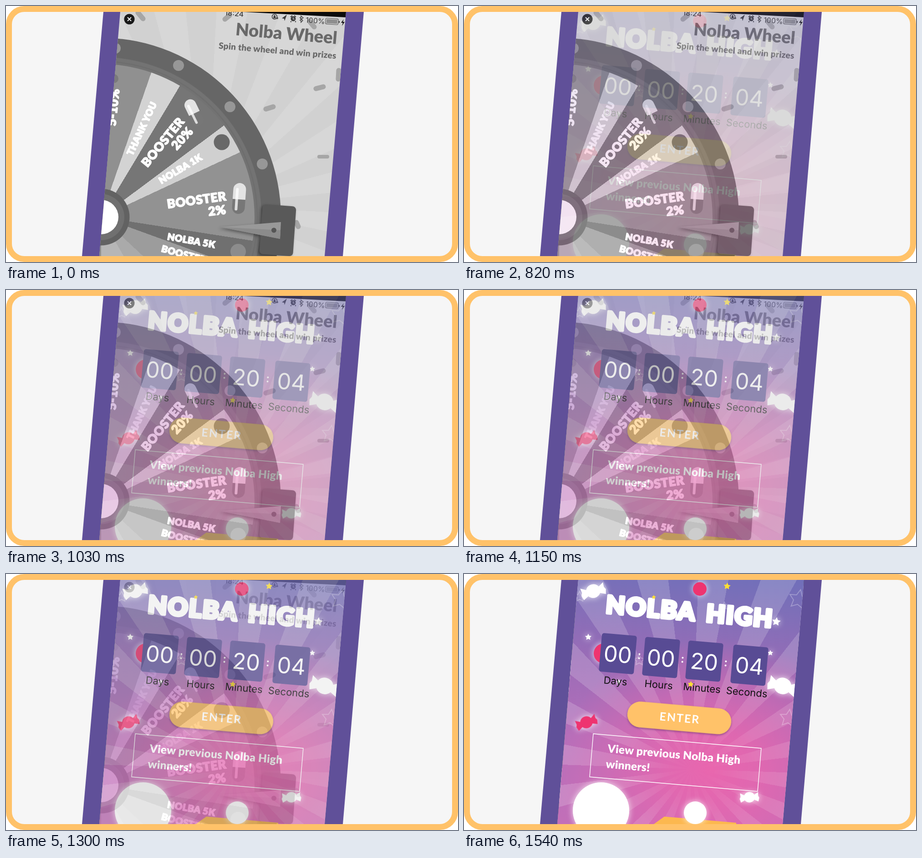
These frames come from a looping animation (993 px wide and 564 px high, 2810 ms). An HTML page:

```html
<!DOCTYPE html>
<html lang="en">
<head>
<meta charset="utf-8">
<title>Prize wheel and countdown</title>
<style>
html, body { margin: 0; width: 100%; height: 100%; overflow: hidden; background: #fff; }
.stage { position: relative; width: 993px; height: 564px; overflow: hidden; }
.frame, .phone, .scene, .scene > * { position: absolute; inset: 0; }
.frame { box-sizing: border-box; border: 13px solid #ffc269; border-radius: 40px; background: #f6f6f6; }
.phone { background: #605099; clip-path: polygon(214px 13px, 786px 13px, 740px 551px, 167px 551px); }
.scene { clip-path: polygon(251px 13px, 747px 13px, 700px 551px, 205px 551px); }
svg { width: 993px; height: 564px; }

.spin { background: repeating-conic-gradient(from 3deg at 440px 440px, #d7d7d7 0 9deg, #d1d1d1 0 18deg); }
.scene > .disc { inset: auto; left: 209px; top: 465px; border-radius: 50%; transform: translate(-50%, -50%); }
.rim { width: 790px; height: 790px; background: radial-gradient(closest-side, #737373 0 89%, #666 89.4%); }
.face {
  width: 674px; height: 674px;
  background: conic-gradient(#909090 19.1deg, #d3d3d3 0 30.9deg, #767676 0 53.2deg, #d0d0d0 0 64.9deg,
    #929292 0 98.9deg, #707070 0 110deg, #9c9c9c 0 133deg, #aaa 0 150deg, #b6b6b6 0 180deg, #909090 0);
}

.party {
  background:
    radial-gradient(340px 290px at 545px 430px, #e966ae 0, #e966aecc 30%, #e966ae00),
    repeating-conic-gradient(from 2deg at 500px 430px, #ffffff1a 0 9deg, #fff0 0 18deg),
    linear-gradient(185deg, #6a6fbb 0, #7c6fb8 15%, #9a6cb7 38%, #b56fba 65%, #c56fb8 100%);
}
.rays {
  background: repeating-conic-gradient(from 2deg at 500px 430px, #ffffff14 0 9deg, #fff0 0 18deg);
  -webkit-mask: radial-gradient(circle at 500px 430px, #0000 30px, #000 150px);
  mask: radial-gradient(circle at 500px 430px, #0000 30px, #000 150px);
}
.high { animation: fade 2810ms infinite; }
@keyframes fade {
  0% { opacity: 0; }
  23.843% { opacity: 0; animation-timing-function: steps(30, start); }
  55.871%, 100% { opacity: 1; }
}

text { font-family: Lato, "Open Sans", sans-serif; font-weight: 900; text-anchor: middle; }
.ui { font-family: Inter, Roboto, sans-serif; font-weight: 400; }
.puffy { fill: #fff; stroke: #fff; stroke-width: 1.8; stroke-linejoin: round; font-size: 27px; letter-spacing: .6px; }
.small { font-size: 20.5px; }
.title { font-size: 54px; stroke-width: 6px; letter-spacing: 2px; word-spacing: 10px; }
.start { text-anchor: start; }
.glow { filter: drop-shadow(0 0 7px #fffc); }
.shade { filter: drop-shadow(-3px 3px 3px #0006); }
.line { fill: none; stroke: #fff; stroke-opacity: .28; stroke-width: 2; }
.line use, #star { vector-effect: non-scaling-stroke; }
</style>
</head>
<body>
<div class="stage">
  <div class="frame"></div>
  <div class="phone"></div>

  <div class="scene">
    <div class="spin"></div>
    <svg viewBox="0 0 993 564">
      <g stroke="#a6a6a6" stroke-width="11" stroke-linecap="round">
        <path d="M681 182l16-4M571 227l16-5M731 142l-1 19M638 477l4 9M481 29l10-8M290 15l11 13M667 34l10 12"/>
        <path d="M688 332h18" stroke-width="8"/>
      </g>
    </svg>
    <div class="disc rim"></div>
    <div class="disc face"></div>
    <svg viewBox="0 0 993 564">
      <circle cx="209" cy="465" r="343" fill="none" stroke="#666" stroke-width="3" stroke-opacity=".35"/>
      <g fill="#979797">
        <circle cx="240" cy="93" r="12"/><circle cx="379" cy="131" r="12"/>
        <circle cx="492" cy="222" r="12"/><circle cx="563" cy="348" r="12"/>
        <circle cx="237" cy="160" r="10" fill="#7b7b7b"/>
      </g>
      <circle cx="209" cy="465" r="62.5" fill="#626262"/>
      <circle cx="209" cy="465" r="51" fill="#707070"/>
      <circle cx="209" cy="465" r="38" fill="#fff"/>

      <g class="puffy">
        <text transform="translate(245 224) rotate(-84)">5-10%</text>
        <text class="small" transform="translate(305 273) rotate(-65)">THANK YOU</text>
        <text transform="translate(352 306) rotate(-51)">BOOSTER</text>
        <text transform="translate(394 298) rotate(-48)">20%</text>
        <text class="small" transform="translate(387 365) rotate(-31)">NOLBA 1K</text>
        <text transform="translate(420 437) rotate(-8)">BOOSTER</text>
        <text transform="translate(465 460) rotate(-7)">2%</text>
        <text class="small" transform="translate(406 524) rotate(10)">NOLBA 5K</text>
        <text class="small start" transform="translate(340 541) rotate(15)">BOOSTER</text>
      </g>
      <circle cx="474" cy="300" r="17.5" fill="#686868"/>
      <circle cx="510" cy="541" r="17" fill="#8c8c8c"/>

      <defs>
        <g id="pill">
          <rect x="-14" y="-34" width="28" height="68" rx="14" fill="#777"/>
          <path d="M-14 2v-22a14 14 0 0 1 28 0v22z" fill="#e3e3e3"/>
          <path d="M-5-20v44" stroke="#fff" stroke-width="6" stroke-linecap="round" opacity=".75"/>
        </g>
      </defs>
      <use href="#pill" transform="translate(413 235) rotate(-26) scale(.92)"/>
      <use href="#pill" transform="translate(512 424) rotate(4)"/>

      <g class="shade">
        <rect x="-37" y="-55" width="74" height="110" rx="8" fill="#595959" transform="translate(597 494) rotate(4)"/>
        <path d="M470 487L604 476 602 513z" fill="#999"/>
      </g>
      <path d="M470 487L602 513 603 494z" fill="#8b8b8b"/>
      <circle cx="588.5" cy="494" r="5.5" fill="#555"/>

      <path d="M520 13H748V25z" fill="#0b0b0b"/>
      <g class="ui" fill="#3d3d3d">
        <text class="ui" font-size="16" style="font-weight:500" transform="translate(501 22) rotate(5)">18:24</text>
        <text class="ui" font-size="16" transform="translate(679 38) rotate(5)">100%</text>
        <circle cx="590" cy="23.5" r="5.5" fill="none" stroke="#3d3d3d" stroke-width="1.5"/>
        <path d="M587.5 23h5v4h-5zM588.5 23v-2q1.5-2 3 0v2M594 29l4-1-1-4zM617 19l-11 8 5 1 1 5z"/>
        <circle cx="631" cy="28" r="5.5"/>
        <path d="M625 24l4-3M637 24l-4-3M627 34l-2 1M635 34l2 1" stroke="#3d3d3d" stroke-width="2"/>
        <path d="M631 25v4h3" fill="none" stroke="#d5d5d5" stroke-width="1.2"/>
        <path d="M645 25l7 7-4 4V22l5 4-8 6" fill="none" stroke="#3d3d3d" stroke-width="1.4"/>
        <g transform="translate(716 34) rotate(4)">
          <rect x="-14" y="-6.5" width="28" height="13" rx="3" fill="none" stroke="#5b5b5b" stroke-width="1.2"/>
          <rect x="-12" y="-4.5" width="24" height="9" rx="1" fill="#8e8e8e"/>
          <path d="M15-2h2v4h-2z"/>
        </g>
        <path d="M742 29l-6 8h4l-2 7 6-9h-4z" fill="#111"/>
      </g>
      <g fill="#696969">
        <text font-size="38" transform="translate(615 74) rotate(5)">Nolba Wheel</text>
        <text font-size="19" transform="translate(596 105) rotate(5)" letter-spacing=".25">Spin the wheel and win prizes</text>
      </g>
      <circle cx="271" cy="29" r="11.5" fill="#191919"/>
      <path d="M267 25l8 8m0-8l-8 8" stroke="#fff" stroke-width="1.8"/>
    </svg>
  </div>

  <div class="scene high">
    <div class="party"></div>
    <div class="rays"></div>
    <svg viewBox="0 0 993 564">
      <defs>
        <path id="star" d="M0-10L2.9-4 9.5-3.1 4.8 1.5 5.9 8.1 0 5-5.9 8.1-4.8 1.5-9.5-3.1-2.9-4z"/>
        <path id="candy" d="M-15-7L-27-14-26-3-29 3-26 14-14 8A17 17 0 0 0 14 8L26 14 29 3 26-3 27-14 15-7A17 17 0 0 0-15-7z"/>
        <rect id="tile" x="-38.5" y="-42.5" width="77" height="85" rx="5" fill="#584b94"/>
      </defs>

      <g class="line">
        <use href="#star" transform="translate(735 56) rotate(12) scale(2.2)"/>
        <use href="#star" transform="translate(713 318) rotate(8) scale(2)"/>
        <use href="#star" transform="translate(385 190) scale(1.2)"/>
        <use href="#star" transform="translate(254 50) scale(1.2)"/>
        <use href="#star" transform="translate(572 70) scale(.8)"/>
      </g>
      <g class="glow" fill="#ee3470">
        <circle cx="518" cy="33" r="15"/>
        <circle cx="307" cy="175" r="22"/>
        <use href="#candy" transform="translate(269 327) rotate(-20) scale(.84)"/>
      </g>
      <g class="glow" fill="#fff">
        <use href="#candy" transform="translate(284 38) rotate(-16) scale(.96)"/>
        <use href="#candy" transform="translate(700 247) rotate(16) scale(1.16)"/>
        <use href="#candy" transform="translate(627 492) rotate(-4) scale(.74)"/>
        <use href="#star" transform="translate(686 105) rotate(8)"/>
        <use href="#star" transform="translate(273 139) scale(.75)"/>
        <use href="#star" transform="translate(673 174) scale(.65)"/>
      </g>

      <text class="puffy title" transform="translate(494 102) rotate(5)">NOLBA HIGH</text>

      <g fill="#fff" font-size="49">
        <g transform="translate(338 175.5) rotate(5)"><use href="#tile"/><text class="ui" y="19">00</text></g>
        <g transform="translate(433 184) rotate(5)"><use href="#tile"/><text class="ui" y="19">00</text></g>
        <g transform="translate(528 192) rotate(5)"><use href="#tile"/><text class="ui" y="19">20</text></g>
        <g transform="translate(627 201) rotate(5)"><use href="#tile"/><text class="ui" y="19">04</text></g>
      </g>
      <path d="M385.4 176.5v0M384.6 185.5v0M480.4 184.5v0M479.6 193.5v0M575.4 192.5v0M574.6 201.5v0"
        stroke="#fff" stroke-width="4" stroke-linecap="round"/>
      <g fill="#fff" class="glow"><use href="#star" transform="translate(340 238) scale(.6)"/></g>
      <g fill="#111" font-size="22">
        <text class="ui" transform="translate(332 243.5) rotate(5)">Days</text>
        <text class="ui" transform="translate(427 251.5) rotate(5)">Hours</text>
        <text class="ui" transform="translate(522 259) rotate(5)">Minutes</text>
        <text class="ui" transform="translate(620.5 268) rotate(5)">Seconds</text>
      </g>
      <g fill="#ffe033">
        <use href="#star" transform="translate(578 27) rotate(5) scale(.8)"/>
        <use href="#star" transform="translate(417 51) scale(.5)"/>
        <use href="#star" transform="translate(498 243) rotate(8) scale(.7)"/>
      </g>

      <g transform="translate(473 317) rotate(5)">
        <rect x="-114.5" y="-28.5" width="229" height="57" rx="28.5" fill="#ffc269" style="filter:drop-shadow(0 2px 2px #5a2f6a99)"/>
        <text x="1" y="9" font-size="25" fill="#fff" letter-spacing="2" style="font-weight:700">ENTER</text>
      </g>

      <path d="M284 352L653 384 645 479 276 447z" fill="none" stroke="#fff" stroke-width="1.4"/>
      <g fill="#fff" font-size="24.5" letter-spacing=".25">
        <text class="start" transform="translate(315 393) rotate(5)">View previous Nolba High</text>
        <text class="start" transform="translate(311 427) rotate(5)">winners!</text>
      </g>

      <path d="M417 551L440 534.5 598 548V551z" fill="#fcb84f"/>
      <g class="glow" fill="#fff">
        <circle cx="301" cy="521" r="62"/>
        <circle cx="508" cy="526" r="25"/>
      </g>
    </svg>
  </div>
</div>
</body>
</html>
```
